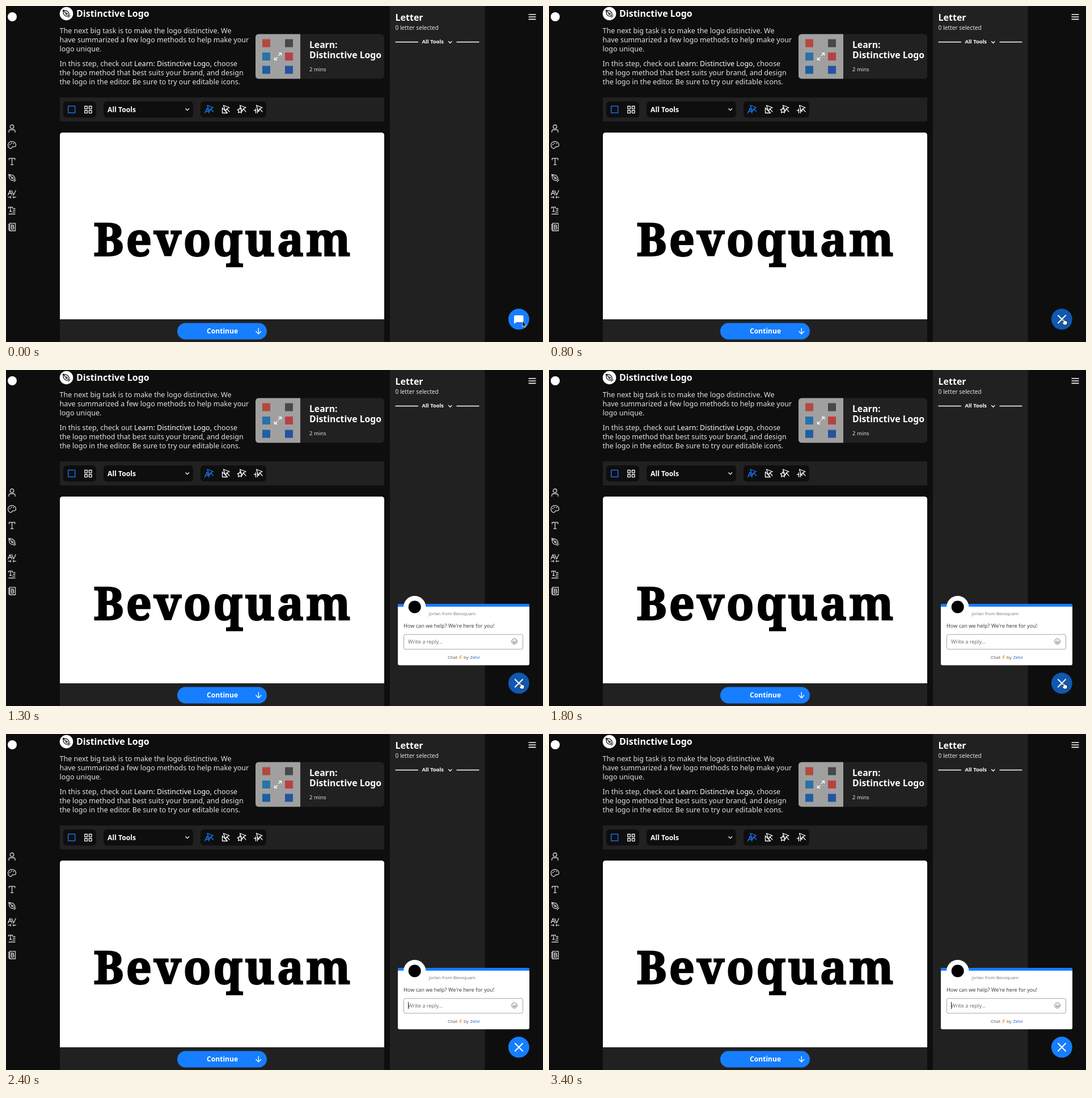
An HTML page that plays this animation: 947 by 592 pixels, repeating every 3500 ms.

```html
<!DOCTYPE html>
<html lang="en">
<head>
<meta charset="utf-8">
<title>Logo editor with chat</title>
<style>
  html, body { margin: 0; width: 100%; height: 100%; overflow: hidden; background: #0e0e0e; }
  svg { display: block; width: 100vw; height: 100vh; }
  text { font-family: "Noto Sans", "Open Sans", sans-serif; fill: #fff; white-space: pre; }
  .h { font-size: 16px; font-weight: 700; }
  .body text { font-size: 12.5px; font-weight: 500; fill: #e2e2e2; }
  .ui { font-size: 12.2px; font-weight: 600; }
  .small { font-size: 10.2px; font-weight: 500; fill: #e2e2e2; }
  .word { font: 900 79px "Noto Serif", serif; letter-spacing: 4.2px; fill: #000; stroke: #000; stroke-width: 2.4px; }
  .chat text { font-family: "Open Sans", "Noto Sans", sans-serif; fill: #333; }
  .line { fill: none; stroke: #fff; stroke-width: 1.3; stroke-linecap: round; stroke-linejoin: round; }
  .side { stroke: #d8d8d8; }
  .blue { stroke: #1a7fff; }
</style>
</head>
<body>
<svg viewBox="0 0 947 592" preserveAspectRatio="none">
  <defs>
    <path id="pointer" d="M-3-7 7.5-3 3-1 .8 3.7ZM3-1 7.5 4.3" fill="#0e0e0e"/>
    <g id="nib">
      <path d="M-6-6 1-4.8Q5-2 4.7 1.7L1.7 4.7Q-2 5-4.8 1Z"/>
      <path d="M-6-6-.6-.6M3.4 6.4 6.4 3.4"/>
      <circle r="1.4" cx=".3" cy=".3"/>
    </g>
  </defs>

  <rect width="947" height="592" fill="#0e0e0e"/>
  <rect x="677" width="167.5" height="592" fill="#212121"/>

  <!-- Sidebar -->
  <circle cx="11" cy="19" r="8" fill="#fff"/>
  <g class="line side">
    <g transform="translate(10.5 216)"><circle cy="-3.3" r="3.2"/><path d="M-5.5 6.5V5Q-5.5 2-2.5 2H2.5Q5.5 2 5.5 5V6.5"/></g>
    <g transform="translate(10.5 245)">
      <path d="M-3 6C-8 4-8-3-4-5.3C1-8 7-5 7 0C7 3 4.5 3.2 2 3C-1 3 1 6.8-3 6Z"/>
      <path d="M-3.6-.8h.1M-1-3.2h.1M2.8-2.4h.1" stroke-width="2"/>
    </g>
    <path d="M5.5 271V268.3H15.7V271M10.6 268.3V279.7M8.4 279.7H12.8"/>
    <use href="#nib" x="11" y="303"/>
    <path d="M3.5 333 7 325 10.5 333M4.7 330.3H9.3M10 325 13.5 333 17.2 325M4 336.8H8.7M12.5 336.8H17.5M8 335.3V338.3M13 335.3V338.3"/>
    <path d="M4.7 356.3V354.3H11.5V356.3M8 354.3V362M6.5 362H9.5M13 357H16M13 360H16M11.5 363.2H16M5 366.5H16"/>
    <path d="M6 382.8H16.5V396H6ZM4.2 385.5H7.2M4.2 388.2H7.2M4.2 391H7.2M4.2 393.8H7.2M9.5 386V393H12Q14 393 14 391.2T12 389.4H9.5M12 389.4Q13.6 389.2 13.6 387.7T12 386H9.5"/>
  </g>

  <!-- Introduction -->
  <circle cx="106.5" cy="13.5" r="11.8" fill="#fff"/>
  <use href="#nib" x="106.5" y="13.5" class="line" style="stroke:#111"/>
  <text class="h" x="124" y="19">Distinctive Logo</text>
  <g class="body">
    <text x="94.5" y="47.5">The next big task is to make the logo distinctive. We</text>
    <text x="94.5" y="63.7">have summarized a few logo methods to help make your</text>
    <text x="94.5" y="79.8">logo unique.</text>
    <text x="94.5" y="105.5">In this step, check out <tspan fill="#fff">Learn: Distinctive Logo,</tspan> choose</text>
    <text x="94.5" y="121.5">the logo method that best suits your brand, and design</text>
    <text x="94.5" y="137.5">the logo in the editor. Be sure to try our editable icons.</text>
  </g>

  <!-- Lesson card -->
  <rect x="440" y="49.5" width="227" height="78.7" rx="6" fill="#212121"/>
  <path d="M519 49.5H446Q440 49.5 440 55.5V122.2Q440 128.2 446 128.2H519Z" fill="#a0a0a0"/>
  <g id="marks"></g>
  <path class="line" d="M480.5 87.5 485.5 83M481.5 83H485.5V87M478.5 90.5 473.5 95M473.5 91V95H477.5"/>
  <text class="h" style="font-size:15.7px" x="535" y="74">Learn:</text>
  <text class="h" style="font-size:15.8px" x="535" y="92.3">Distinctive Logo</text>
  <text class="small" style="font-size:9.5px" x="535" y="115.3">2 mins</text>

  <!-- Toolbar -->
  <rect x="95" y="161" width="572" height="42.3" fill="#212121"/>
  <g fill="#0e0e0e">
    <rect x="101" y="168" width="58" height="28.5" rx="6"/>
    <rect x="172" y="168" width="158" height="28.5" rx="6"/>
    <rect x="343" y="168" width="116" height="28.5" rx="6"/>
  </g>
  <rect class="line blue" x="109.7" y="176.3" width="12" height="12" stroke-linejoin="miter"/>
  <path class="line" d="M138.8 176.5h4.6v4.6h-4.6zM146.4 176.5h4.6v4.6h-4.6zM138.8 184h4.6v4.6h-4.6zM146.4 184h4.6v4.6h-4.6z"/>
  <text class="ui" x="179" y="186.5">All Tools</text>
  <path class="line" d="M316.8 181 319.7 183.9 322.6 181"/>
  <g class="line">
    <g class="blue" transform="translate(358 182)"><path d="M-7.3 6.8-3.6-2 .1 6.8M-6 3.8H-1.2"/><use href="#pointer"/></g>
    <g transform="translate(386.5 182)"><path d="M-5-2.5V6.5H4Z"/><use href="#pointer"/></g>
    <g transform="translate(415.5 182)"><path d="M-3-2.8-1.6 0 1.5.6-.8 2.8-.2 6.3-3 4.7-5.8 6.3-5.3 2.8-7.3.6-4.4 0Z"/><use href="#pointer"/></g>
    <g transform="translate(444.5 182)"><path d="M-7 2H-4M-4-1V6.5M-1 0V6.5M-1 3H2"/><use href="#pointer"/></g>
  </g>

  <!-- Canvas -->
  <path d="M95 552V228Q95 223 100 223H662Q667 223 667 228V552Z" fill="#fff"/>
  <text class="word" x="383" y="440" text-anchor="middle">Bevoquam</text>
  <rect x="95" y="552" width="572" height="40" fill="#212121"/>
  <rect x="302" y="558.5" width="158" height="29" rx="14.5" fill="#167eff"/>
  <text class="ui" style="font-size:12.1px" x="354" y="577.2">Continue</text>
  <path class="line" d="M445.3 568V577.5M440.8 573.2 445.3 577.7 449.8 573.2"/>

  <!-- Letter panel -->
  <text class="h" x="686.5" y="25.6">Letter</text>
  <text class="small" x="686.5" y="42.3">0 letter selected</text>
  <path class="line" d="M687 63.5H726.5M795 63.5H834M780.5 62.5 783.3 65.2 786 62.5"/>
  <text x="733.5" y="66.4" style="font-size:9.4px;font-weight:700">All Tools</text>
  <path class="line" style="stroke-width:1.6;stroke-linecap:butt" d="M921.5 15H934.5M921.5 19.2H934.5M921.5 23.4H934.5"/>

  <!-- Chat window -->
  <g id="popup" class="chat">
    <rect x="691" y="412" width="232" height="108.3" rx="3" fill="#fff"/>
    <path d="M691 417V414Q691 412 693 412H921Q923 412 923 414V417Z" fill="#147dff"/>
    <circle cx="720.7" cy="417.5" r="19.6" fill="#fff"/>
    <circle cx="720.7" cy="417.5" r="11" fill="#000"/>
    <text x="745.5" y="432" style="font-size:7.9px;fill:#777">jorlan from Bevoquam</text>
    <text x="701" y="454.3" style="font-size:9.2px">How can we help? We're here for you!</text>
    <rect x="701.5" y="466" width="210" height="26" rx="2.5" fill="#fff" stroke="#a0a5aa"/>
    <text x="709" y="481.5" style="font-size:9.2px;fill:#666">Write a reply...</text>
    <g fill="none" stroke="#666" stroke-width=".9" stroke-linecap="round">
      <circle cx="896.5" cy="478.3" r="4.8"/>
      <path d="M894 479.5Q896.5 483 899 479.5Z"/>
      <path d="M894.8 476.8h.1M898.2 476.8h.1" stroke-width="1.3"/>
    </g>
    <text x="779" y="509" style="font-size:7.9px;fill:#555">Chat</text>
    <path d="M802.5 502 798.8 507H801L799.5 511 804.2 505.6H801.8L804 502Z" fill="#f9b233"/>
    <text x="807" y="509" style="font-size:7.9px;fill:#555">by</text>
    <text x="818.5" y="509" style="font-size:7.9px;fill:#1263c4">Zelvi</text>
    <path id="caret" d="M709.5 472V484.5" stroke="#222" stroke-width="1"/>
  </g>

  <!-- Chat button -->
  <circle id="button" cx="904.3" cy="551.8" r="18.5"/>
  <path id="bubble" d="M898.5 545H910Q912.5 545 912.5 547.5V554.5Q912.5 557 910 557H900.5L896 559.8V547.5Q896 545 898.5 545Z" fill="#fff"/>
  <path id="cross" class="line" style="stroke-width:2" d="M897.8 545.3 911 558.5M911 545.3 897.8 558.5"/>
  <path id="arrow" d="M910.8 555V565.2L913.1 563.1 914.7 566.5 916.4 565.7 914.8 562.4H917.8Z" fill="#000" stroke="#fff" stroke-width=".8"/>
  <path id="hand" d="M907 556.8V551.6Q908 550 909 551.6V554.3Q910.3 553.6 910.8 554.8 912 554.2 912.4 555.4 914 555 914 556.6V559L912.8 562H907.6L904.8 557.7Q905 556 907 557.6Z" fill="#fff" stroke="#000" stroke-width=".8" stroke-linejoin="round"/>
</svg>
<script>
  const LOOP = 3500;
  const el = id => document.getElementById(id);
  const show = (id, on) => el(id).setAttribute("visibility", on ? "visible" : "hidden");
  const within = (t, from, to = LOOP) => t >= from && t < to;

  const colours = ["#b34a3c", "#484848", "#2872a8", "#b94145", "#1d5fa4", "#25539f"];
  el("marks").innerHTML = colours.map((fill, i) => {
    const x = 452 + (i % 2) * 40, y = 58.5 + Math.floor(i / 2) * 23.5;
    return `<rect x="${x}" y="${y}" width="14" height="14" fill="${fill}"/>`;
  }).join("");

  function draw(t) {
    const hover = within(t, 300, 2000);
    const open = within(t, 800);
    el("button").setAttribute("fill", hover ? "#1058b0" : "#167eff");
    show("bubble", !open);
    show("cross", open);
    show("arrow", within(t, 0, 300));
    show("hand", hover);
    show("popup", within(t, 900));
    // The caret blinks once a second after focus.
    show("caret", within(t, 2400) && (t - 2400) % 1000 < 500);
  }

  const start = performance.now();
  function tick(now) {
    draw(Math.max(0, now - start) % LOOP);
    requestAnimationFrame(tick);
  }
  draw(0);
  requestAnimationFrame(tick);
</script>
</body>
</html>
```
